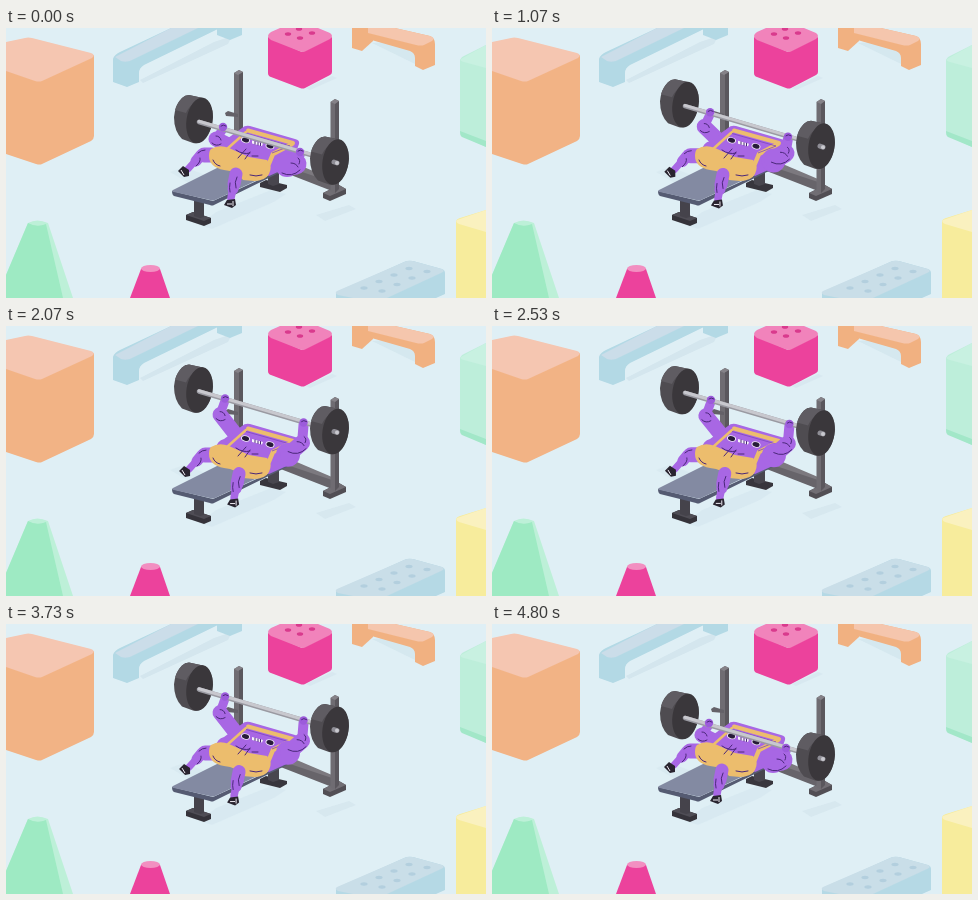
These frames come from a looping animation (480x270 px, 4.87 s). An HTML page:

```html
<!DOCTYPE html>
<html lang="en">
<head>
<meta charset="utf-8">
<title>Bench press</title>
<style>
  html, body { margin: 0; width: 100%; height: 100%; overflow: hidden; background: #dfeff5; }
  svg { display: block; width: 100vw; height: 100vh; }
  .limb { fill: none; stroke: #a867e4; stroke-linecap: round; stroke-linejoin: round; }
  .strap { fill: none; stroke: #ecbd6d; stroke-linecap: round; stroke-linejoin: round; }
  .ink { fill: none; stroke: #4a2779; stroke-width: 1; stroke-linecap: round; }
  .shade { fill: #d4e6ee; }
  .skin { fill: #a867e4; }
</style>
</head>
<body>
<svg viewBox="0 0 480 270" preserveAspectRatio="none">
  <defs>
    <g id="plate">
      <path d="M168 89Q169 77 176 70Q179 67 183 67L197 70Q207 75 207 89Q206 105 196 113Q192 116 187 115L176 111Q168 103 168 89Z" fill="#4f4c51"/>
      <path d="M176 70Q179 67 183 67L197 70L190 74Q183 78 180 85L169 82Q171 75 176 70Z" fill="#5f5c62"/>
      <ellipse cx="193.500" cy="92.500" rx="13" ry="23" transform="rotate(9 193.500 92.500)" fill="#3a373b"/>
    </g>
  </defs>
  <rect width="480" height="270" fill="#dfeff5"/>

  <!-- toys -->
  <g>
    <path d="M0 40L33 53L88 27V108Q88 111 85 113L36 136Q34 137 30 136L0 126Z" fill="#f2b385"/>
    <path d="M0 14L19 10Q22 9 26 10L85 25Q90 27 86 30L36 53Q33 54 29 53L0 43Z" fill="#f5c6b1"/>
  </g>
  <g>
    <path class="shade" d="M134 52L208 14L226 8L222 16L137 55Z"/>
    <path d="M107 31Q108 27 114 24L165 0H214L138 37Q133 40 133 45V54L121 59L107 54Z" fill="#b3d9e5"/>
    <path d="M109 29L165 0H192L128 31Q122 35 115 33Z" fill="#cbdde9"/>
    <path d="M211 0H236V7L224 12L211 7Z" fill="#b3d9e5"/>
  </g>
  <g>
    <path class="shade" d="M300 60L326 48L331 50L304 62Z" opacity=".7"/>
    <path d="M262 9L296 24L326 9V44Q326 46 324 47L299 60Q297 61 294 60L265 49Q262 48 262 45Z" fill="#ec429c"/>
    <path d="M262 8Q262 6 265 4L274 0H312L324 5Q328 8 324 11L300 23Q297 25 293 23L265 12Q262 10 262 8Z" fill="#f183bb"/>
    <g fill="#d93a8d">
      <ellipse cx="282" cy="6" rx="3.200" ry="1.800"/><ellipse cx="293" cy="1" rx="3.200" ry="1.800"/>
      <ellipse cx="294" cy="10" rx="3.200" ry="1.800"/><ellipse cx="306" cy="5" rx="3.200" ry="1.800"/>
    </g>
  </g>
  <g>
    <path class="shade" d="M366 15L380 14L420 28L409 36Z" opacity=".8"/>
    <path d="M346 0H367V13L356 23L346 20Z" fill="#f1b181"/>
    <path d="M362 0H389L424 8Q429 10 429 16V37L417 42L409 38V30Q409 25 404 23L362 11Z" fill="#f1b181"/>
    <path d="M362 0H389L424 8Q430 10 426 13L418 17Q415 18 410 17L362 5Z" fill="#f5c6ad"/>
  </g>
  <g>
    <path d="M454 33Q454 30 458 28L480 17V119L456 108Q454 107 454 104Z" fill="#bdeeda"/>
    <path d="M454 103L480 113V119L456 109Q454 108 454 103Z" fill="#a2e7c8"/>
    <path d="M455 31L480 17V40L458 34Q454 33 455 31Z" fill="#c8f1e1"/>
  </g>
  <g>
    <path d="M0 247L22 195Q31 190 42 195L67 270H0Z" fill="#bdf0d8"/>
    <path d="M0 247L22 195Q31 200 40 196L57 270H0Z" fill="#9eeac3"/>
  </g>
  <g>
    <path d="M135 241H154L164 270H124Z" fill="#ec429c"/>
    <ellipse cx="144.500" cy="240.500" rx="9.500" ry="3.500" fill="#f28fc1"/>
  </g>
  <g>
    <path d="M330 265L398 234Q402 232 407 233L436 241Q439 242 439 245V266L430 270H330Z" fill="#b5d9e5"/>
    <path d="M331 263L398 234Q402 232 407 233L436 241Q440 243 435 245L381 270H347L332 267Q328 265 331 263Z" fill="#c9dee8"/>
    <g id="studs" fill="#b3cfde"></g>
  </g>
  <g>
    <path d="M450 194Q450 191 454 190L480 182V270H450Z" fill="#f7ec9c"/>
    <path d="M451 192L480 182V204L453 196Q449 194 451 192Z" fill="#faf1bf"/>
  </g>

  <!-- bench and rack -->
  <g class="shade">
    <path d="M164 144L178 139L205 149L186 157Z" opacity=".5"/>
    <path d="M193 197L206 201L268 174L280 166L265 162L210 184Z" opacity=".55"/>
    <path d="M310 187L343 177L350 181L319 193Z" opacity=".75"/>
  </g>
  <path d="M228 45L233 42L237 44V108H228Z" fill="#6f6c72"/>
  <path d="M233 46L237 44V108H233Z" fill="#5a575d"/>
  <path d="M228 45L233 42L237 44L232 47Z" fill="#858288"/>
  <path d="M219 85L222 83L232 86V89L220 88Z" fill="#646168"/>
  <path d="M272 133L283 135L326 153V163L272 142Z" fill="#67646a"/>
  <path d="M274 132L286 134L326 151V154L275 137Z" fill="#7c797f"/>
  <path d="M317 165L333 157L340 161V166L324 173L317 170Z" fill="#514e54"/>
  <path d="M317 165L333 157L340 161L324 168Z" fill="#716e74"/>
  <path d="M324.500 74L329 71L333 73V161L328 165L324.500 163Z" fill="#6f6c72"/>
  <path d="M329 75L333 73V161L329 165Z" fill="#5a575d"/>
  <path d="M324.500 74L329 71L333 73L329 76Z" fill="#858288"/>
  <path d="M254 155L260 152L281 157V160L274 164L254 159Z" fill="#38363d"/>
  <path d="M262 142H273V156L267 158L262 156Z" fill="#48464e"/>
  <path d="M180 187L187 184L205 190V195L198 198L180 192Z" fill="#35333a"/>
  <path d="M180 187L187 184L205 190L198 193Z" fill="#4f4d55"/>
  <path d="M188 172H198V189L194 190L188 188Z" fill="#45434b"/>
  <path d="M166 163L207 173L281 139V141L208 177Q206 178 204 177L168 168Q166 167 166 163Z" fill="#555b72"/>
  <path d="M167 162L215 138L281 138L209 172Q207 173 204 172L168 164Q165 163 167 162Z" fill="#838aa2"/>

  <g id="backPlate"><use href="#plate"/></g>

  <!-- lifter -->
  <path class="limb" id="foreL" stroke-width="9"/>
  <path class="limb" id="upperL" stroke-width="15"/>
  <path class="skin" d="M210 122Q211 115 218 113L236 100Q239 97 244 98L289 111Q294 112 293 116L285 138L263 148L225 136Z"/>
  <path class="strap" d="M240 104L221 121" stroke-width="2.500"/>
  <path class="strap" d="M242 102.500L287 115" stroke-width="4"/>
  <path class="strap" d="M286 116L267 126L262 138" stroke-width="4.500"/>
  <path d="M240 105.500L284 118L266 125" fill="none" stroke="#7d47bd" stroke-width=".8"/>
  <g id="legL">
    <path class="limb" d="M206 127L198 127" stroke-width="15"/>
    <path class="limb" d="M195 127L190 133" stroke-width="11"/>
    <path class="limb" d="M190 132L182 141" stroke-width="7"/>
    <path class="ink" d="M194 130Q195 134 190 138M199 122Q195 122 192 125"/>
    <path d="M172 143L177 138L183 142L183 148L178 149Z" fill="#29242f"/>
    <path d="M175 142L178 147" stroke="#f1edf5" stroke-width="1"/>
  </g>
  <path d="M205 121Q213 116 223 120L243 129L261 132Q267 138 263 146Q259 153 248 153L237 152Q231 143 218 142Q203 139 203 128Q203 123 205 121Z" fill="#ecbd6d"/>
  <g id="legR">
    <path class="limb" d="M230 146L228 156" stroke-width="13"/>
    <path class="limb" d="M228 156L227 161" stroke-width="11"/>
    <path class="limb" d="M227 160L225 170" stroke-width="7.500"/>
    <path class="ink" d="M231 149Q228 154 230 160M224 155Q223 160 224 164"/>
    <path d="M221 172L229 171L230 177L226 180L218 177Z" fill="#29242f"/>
    <path d="M221 176L226 176M227 173L227 178" stroke="#f1edf5" stroke-width="1"/>
  </g>
  <path class="ink" d="M230 122Q237 127 244 125M246 128L252 128M240 121L232 130M244 124L239 131M207 132Q209 137 214 138M244 147Q250 149 256 147"/>
  <g id="face">
    <g id="eyes"></g>
    <path d="M246 112.500L257 115.500L256 118L246 115.500Z" fill="#f7f2fa"/>
    <path class="ink" d="M249 113.500V116M252 114.500V117M254.500 115V117.500" stroke-width=".5"/>
  </g>
  <circle class="skin" id="shoulderR" r="12"/>
  <path class="limb" id="foreR" stroke-width="10"/>
  <path class="limb" id="upperR"/>
  <path class="ink" id="inkL"/>
  <path class="ink" id="inkR"/>

  <!-- barbell -->
  <g id="bar">
    <path d="M193 94L322 132" stroke="#9a9aa2" stroke-width="4.600" stroke-linecap="round"/>
    <path d="M193 93.300L322 131.300" stroke="#c8c8ce" stroke-width="3" stroke-linecap="round"/>
    <g id="fists"></g>
    <use href="#plate" x="136" y="41.500"/>
    <path d="M328 134L331 135" stroke="#8e8d95" stroke-width="5" stroke-linecap="round"/>
    <circle cx="331" cy="135" r="2" fill="#c9c9cf"/>
  </g>
</svg>
<script>
  const LOOP = 4870, REPS = 3, STEPS = 73, TOP = 28;
  const $ = id => document.getElementById(id);
  const set = (id, attrs) => { for (const k in attrs) $(id).setAttribute(k, attrs[k]); };
  const move = (id, x, y) => set(id, { transform: `translate(${x} ${y})` });
  const mix = (a, b, k) => a + (b - a) * k;
  const between = (a, b, k) => a.map((v, i) => mix(v, b[i], k));

  // Bar height over one repetition: [phase, height]
  const lift = [[0, 0], [0.17, 30.5], [0.28, 28.5], [0.53, 28], [0.81, 0], [1, 0]];

  function heightAt(p) {
    const i = lift.findIndex(s => s[0] > p);
    const [p0, h0] = lift[i - 1], [p1, h1] = lift[i];
    const u = (p - p0) / (p1 - p0);
    return mix(h0, h1, u * u * (3 - 2 * u));
  }

  let studs = '';
  for (let r = 0; r < 2; r++)
    for (let c = 0; c < 4; c++)
      studs += `<ellipse cx="${358 + c * 15 + r * 18}" cy="${260 - c * 6.5 + r * 3}" rx="3.600" ry="1.700"/>`;
  $('studs').innerHTML = studs;

  $('eyes').innerHTML = [[239.5, 112], [264, 118]].map(([x, y]) =>
    `<g transform="translate(${x} ${y}) rotate(15)"><ellipse rx="4.600" ry="3" fill="#efe6f6"/>
     <ellipse rx="3.600" ry="2.300" fill="#271b38"/></g>`).join('');

  $('fists').innerHTML = ['L', 'R'].map(s =>
    `<g id="fist${s}"><circle r="4.200" fill="#9c5bdb"/><path class="ink" d="M-2 -1Q0 -3 3 -1" stroke-width=".8"/></g>`).join('');

  function arm(side, shoulder, elbow, hand) {
    set('upper' + side, { d: `M${shoulder}L${elbow}` });
    set('fore' + side, { d: `M${elbow}L${hand}` });
  }

  function pose(h) {
    const k = h / TOP;
    move('backPlate', 0, -h);
    move('bar', 0, -h);

    // Fists ride on the bar and lean outward as it rises
    const gripL = between([217, 99], [219, 101], k);
    const gripR = between([294, 124], [297.5, 125], k);
    move('fistL', ...gripL);
    move('fistR', ...gripR);

    const elbowL = between([210, 111], [214, 89], k);
    const elbowR = between([290, 136], [296, 117], k);
    const shoulderR = between([281, 137], [282, 129], k);
    arm('L', between([222, 117], [229, 108], k), elbowL, [gripL[0], gripL[1] - h + 2]);
    arm('R', shoulderR, elbowR, [gripR[0], gripR[1] - h + 2]);
    set('upperR', { 'stroke-width': mix(21, 16, k) });
    set('shoulderR', { cx: shoulderR[0], cy: shoulderR[1] });
    set('inkL', { d: `M${elbowL}m-4 4q4 4 9 1m-5 -8q4 0 5 4` });
    set('inkR', { d: `M${elbowR}m-14 9q10 5 18 -3m-9 -7q5 0 7 4m0 -9q3 2 1 6` });

    const sag = k * k;
    move('legL', sag, 2 * sag);
    move('legR', 3 * sag, 1.5 * sag);
    move('face', 0, 0.5 * k);
  }

  function draw(now) {
    const step = Math.floor((now % LOOP + 7) * STEPS / LOOP) % STEPS;
    pose(heightAt(step * REPS / STEPS % 1));
    requestAnimationFrame(draw);
  }
  draw(performance.now());
</script>
</body>
</html>
```
